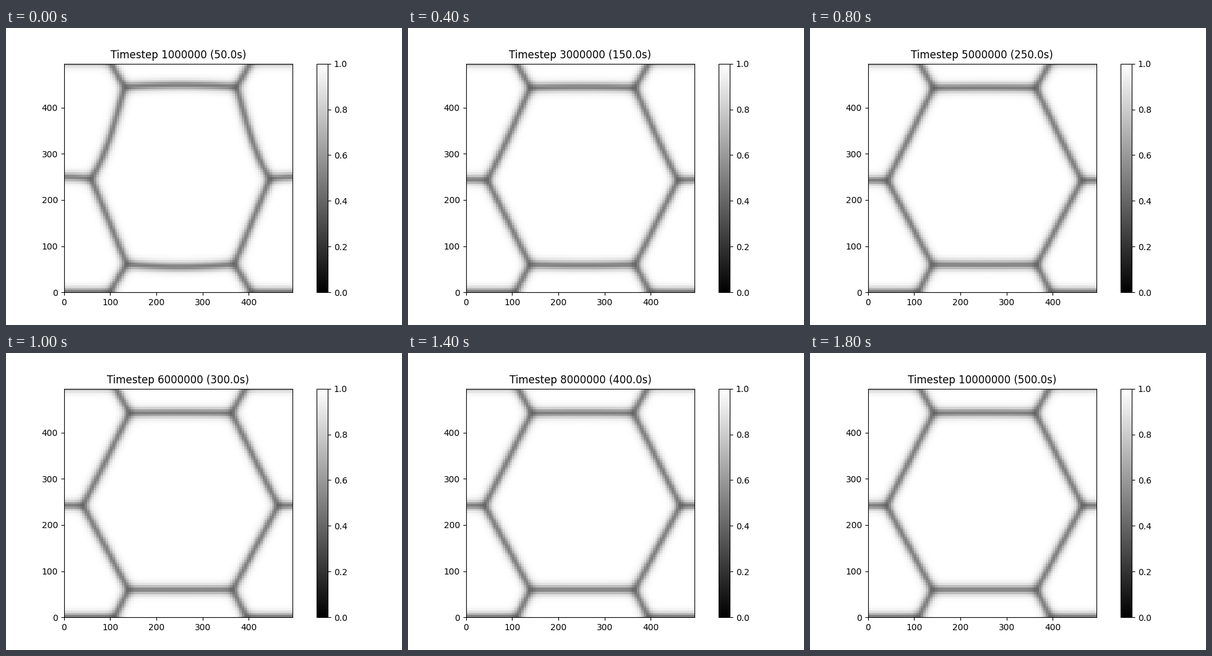
These frames come from a looping animation (640x480 px, 2000 ms). A matplotlib script:

```python
import numpy as np
import matplotlib.pyplot as plt
from matplotlib.animation import FuncAnimation

SIZE = 500       # periodic box
STEP = 5         # grid spacing
WIDTH = 9        # half width of a diffuse boundary
FRAMES = 10
DECAY = 0.55     # share of the initial distortion left after each frame

edges = np.arange(0, SIZE, STEP)
X, Y = np.meshgrid(edges.astype(float), edges.astype(float))
X = SIZE / 2 - np.abs(X - SIZE / 2)   # left-right mirror symmetry


def bezier(a, c, b, n=10):
    t = np.linspace(0, 1, n + 1)[:, None]
    a, c, b = map(np.asarray, (a, c, b))
    return (1 - t) ** 2 * a + 2 * t * (1 - t) * c + t ** 2 * b


def straight(a, b):
    return bezier(a, (np.asarray(a) + b) / 2, b)


def distance(line):
    """Distance from every node to a polyline, periodic in y."""
    best = np.full(X.shape, np.inf)
    for (x0, y0), (x1, y1) in zip(line[:-1], line[1:]):
        ux, uy = x1 - x0, y1 - y0
        dx = X - x0
        dy = (Y - y0 + SIZE / 2) % SIZE - SIZE / 2
        t = np.clip((dx * ux + dy * uy) / (ux * ux + uy * uy), 0, 1)
        best = np.minimum(best, np.hypot(dx - t * ux, dy - t * uy))
    return best


def relax(share, steps=30, dt=0.1):
    """Short phase-field relaxation that settles the triple junctions."""
    kappa = WIDTH ** 2 / 2 / STEP ** 2
    for _ in range(steps):
        near = sum(np.roll(share, s, axis) for s in (1, -1) for axis in (1, 2))
        squares = (share ** 2).sum(axis=0)
        force = share ** 3 - share + 3 * share * (squares - share ** 2)
        share = share + dt * (kappa * (near - 4 * share) - force)
    return share


def field(k):
    """Sum of squared grain fractions; k = 1 is distorted, 0 relaxed."""
    mid = SIZE / 2
    base = np.array([108 - 11 * k, -2])
    low = np.array([137.3 - 4 * k, 57.5 + 1.2 * k])
    side = np.array([37.8 + 19 * k, 239.5 + 4 * k])
    high = np.array([140 - 12 * k, 439.7 + 2.3 * k])
    floor_y, roof_y, wall_y = 57.5 - 4.8 * k, 440.2 + 6 * k, 239.5 + 8 * k

    foot = straight(base, low)
    lower = straight(low, side)
    bend = side + 0.25 * (high - side) + [17 * k, 0]
    upper = bezier(side, bend, high)
    head = straight(high, base + [0, SIZE])
    floor = bezier(low, ((low[0] + mid) / 2, floor_y), (mid, floor_y))
    roof = bezier(high, ((high[0] + mid) / 2, roof_y), (mid, roof_y))
    wall = bezier((0, wall_y), (side[0] / 2, wall_y), side)
    ground = straight((0, base[1]), base)

    # which grain each node lies in
    flank = np.vstack([foot, lower, upper, head])
    inner = X > np.interp(Y, flank[:, 1], flank[:, 0])
    central = (Y > np.interp(X, *floor.T)) & (Y < np.interp(X, *roof.T))
    above = Y > np.interp(X, *wall.T)

    d_foot, d_lower, d_upper, d_head, d_floor, d_roof, d_wall, d_ground = map(
        distance, (foot, lower, upper, head, floor, roof, wall, ground))
    grains = [
        (inner & central, (d_lower, d_upper, d_floor, d_roof)),
        (inner & ~central, (d_foot, d_head, d_floor, d_roof)),
        (~inner & ~above, (d_foot, d_lower, d_wall, d_ground)),
        (~inner & above, (d_upper, d_head, d_wall, d_ground)),
    ]
    signed = np.array([np.where(inside, 1, -1) * np.min(ds, axis=0)
                       for inside, ds in grains])
    weight = np.exp((signed - signed.max(axis=0)) / WIDTH)
    share = relax(weight / weight.sum(axis=0))
    return (share ** 2).sum(axis=0)[:-1, :-1]


fields = [field(DECAY ** n) for n in range(FRAMES)]

plt.rcParams["font.family"] = "DejaVu Sans"
fig, ax = plt.subplots(figsize=(6.4, 4.8), dpi=100)
mesh = ax.pcolormesh(edges, edges, fields[0], cmap="gray", vmin=0, vmax=1)
fig.colorbar(mesh, ax=ax, panchor=False)
ax.set_aspect("equal", anchor="C")
ax.set_xticks(range(0, 500, 100))
ax.set_yticks(range(0, 500, 100))
title = ax.set_title("")


def draw(n):
    mesh.set_array(fields[n])
    title.set_text(f"Timestep {(n + 1) * 1000000} ({(n + 1) * 50:.1f}s)")
    return mesh, title


anim = FuncAnimation(fig, draw, frames=FRAMES, interval=200,
                     repeat=True, repeat_delay=0, blit=False)
plt.show()
```
